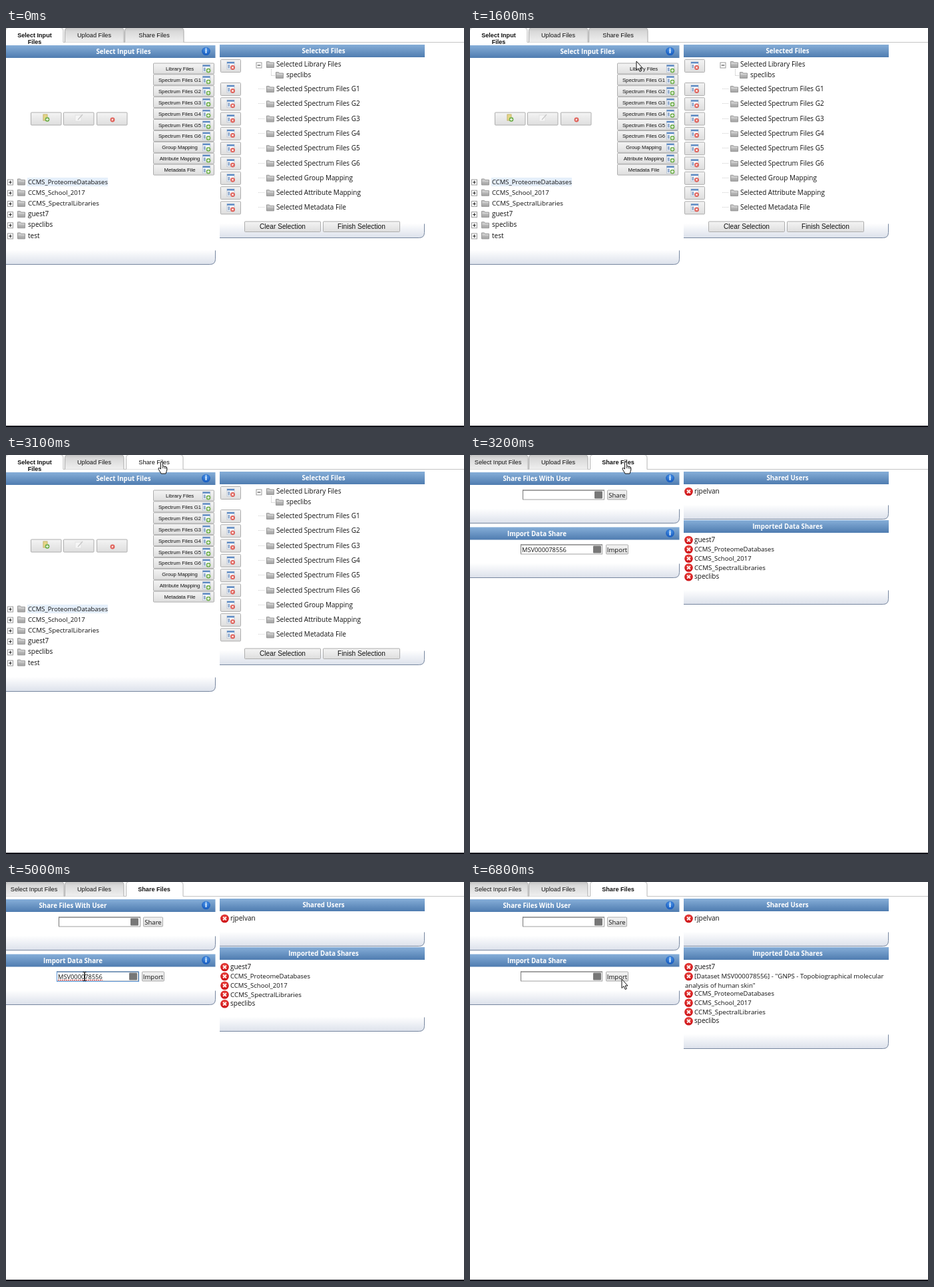
These frames come from a looping animation (688x600 px, 7100 ms). An HTML page:

```html
<!DOCTYPE html>
<html lang="en">
<head>
<meta charset="utf-8">
<title>File sharing</title>
<style>
html, body { margin: 0; width: 100%; height: 100%; overflow: hidden; background: #fff; }
svg { display: block; width: 688px; height: 600px; }
text { font-family: "Open Sans", "Noto Sans", sans-serif; font-size: 10px; fill: #111; }
.ui { font-family: "Liberation Sans", Arial, sans-serif; }
.head { font-size: 9.7px; font-weight: 700; fill: #fff; }
.mid { text-anchor: middle; }
</style>
</head>
<body>
<svg id="stage" viewBox="0 0 688 600">
  <defs>
    <linearGradient id="bar" x2="0" y2="1"><stop stop-color="#86aed8"/><stop offset="1" stop-color="#4f7cb0"/></linearGradient>
    <linearGradient id="foot" x2="0" y2="1"><stop stop-color="#fff"/><stop offset="1" stop-color="#dce1eb"/></linearGradient>
    <linearGradient id="tab" x2="0" y2="1"><stop stop-color="#c2c2c2"/><stop offset=".25" stop-color="#d8d8d8"/><stop offset="1" stop-color="#f0f0f0"/></linearGradient>
    <linearGradient id="btn" x2="0" y2="1"><stop stop-color="#f4f4f4"/><stop offset="1" stop-color="#dedede"/></linearGradient>
    <linearGradient id="fold" x2="0" y2="1"><stop stop-color="#cfcfcf"/><stop offset="1" stop-color="#a2a2a2"/></linearGradient>
    <radialGradient id="blue" cy=".35"><stop stop-color="#5aa2f0"/><stop offset="1" stop-color="#1d62c4"/></radialGradient>
    <radialGradient id="red" cy=".35"><stop stop-color="#f4584e"/><stop offset="1" stop-color="#d0181c"/></radialGradient>
  </defs>
</svg>
<script>
const LOOP = 7100, STEP = 100;
const ENTER = 300, SWITCH = 3200, FOCUS = 4600, DONE = 6200;

const rect = (x, y, w, h, fill, stroke = 'none', r = 0) =>
  `<rect x="${x}" y="${y}" width="${w}" height="${h}" rx="${r}" fill="${fill}" stroke="${stroke}"/>`;
const path = (d, stroke, fill = 'none', extra = '') =>
  `<path d="${d}" fill="${fill}" stroke="${stroke}" ${extra}/>`;
const circle = (x, y, r, fill) => `<circle cx="${x}" cy="${y}" r="${r}" fill="${fill}"/>`;
const text = (x, y, s, size = 10, cls = '', weight = 400) =>
  `<text x="${x}" y="${y}" class="${cls}" style="font-size:${size}px;font-weight:${weight}">${s}</text>`;
const group = (id, s) => `<g id="${id}">${s}</g>`;
const at = (x, y, s) => `<g transform="translate(${x} ${y})">${s}</g>`;

// Page furniture
const header = (x, y, w, cx, s) => rect(x, y, w, 19, 'url(#bar)') +
  `<text x="${cx}" y="${y + 13}" class="head mid">${s}</text>`;
const footer = (x, bottom, right) => {
  const edge = `V${bottom - 8}Q${right} ${bottom} ${right - 8} ${bottom}H${x}`;
  return path(`M${x} ${bottom - 22}H${right}${edge}Z`, 'none', 'url(#foot)') +
    path(`M${right} ${bottom - 21}${edge}`, '#76869f');
};
const info = y => circle(300.5, y, 6.3, 'url(#blue)') +
  `<text x="300.5" y="${y + 3.4}" class="head mid">i</text>`;
const button = (x, y, w, h) => rect(x + .5, y + .5, w - 1, h - 1, 'url(#btn)', '#adadad', 1);
const tab = (x, right, on) => path(
  `M${x + .5} 21.5V4.5Q${x + .5} -.5 ${x + 5} -.5H${right - 5}Q${right} -.5 ${right} 4.5V21.5`,
  on ? '#b4b4b4' : '#a8a8a8', on ? '#fff' : 'url(#tab)');
const tabText = (cx, y, s, bold) => text(cx, y, s, bold ? 9.1 : 9.2, 'ui mid', bold ? 700 : 400);
const baseLine = path('M0 21.5H688', '#c4c4c4');

// Icons
const folder = (x, y) => at(x, y, path('M.5 -4.5H4.5L5.5 -3H11.5V4.5H.5Z', '#999', 'url(#fold)') +
  path('M1.5 -1.5H11', '#e2e2e2', 'none', 'stroke-width=".8"'));
const toggle = (x, y, plus) => rect(x - 4, y - 4, 8, 8, '#fff', '#9a9a9a') +
  path(`M${x - 2.3} ${y}h4.6` + (plus ? `M${x} ${y - 2.3}v4.6` : ''), '#222');
const sheet = (x, y) => rect(x, y - 6, 11, 11, '#fbfcfe', '#c0c9d6') +
  rect(x, y - 6, 11, 2.4, '#5c8ac4') + rect(x + 1.3, y - 2, 3, 5.5, '#93abcd');
const badge = (x, y, fill, d) => circle(x, y, 3.4, fill) + at(x, y, path(d, '#fff', 'none', 'stroke-width="1.1"'));
const plusBadge = (x, y) => badge(x, y, '#74b152', 'M-2 0H2M0 -2V2');
const crossBadge = (x, y) => badge(x, y, '#de5a52', 'M-1.3 -1.3L1.3 1.3M1.3 -1.3L-1.3 1.3');
const remove = y => circle(328.5, y, 6.3, 'url(#red)') +
  at(328.5, y, path('M-2.4 -2.4L2.4 2.4M2.4 -2.4L-2.4 2.4', '#fff', 'none', 'stroke-width="1.8"'));

// Selection page
const slots = ['Library Files', ...[1, 2, 3, 4, 5, 6].map(n => 'Spectrum Files G' + n),
  'Group Mapping', 'Attribute Mapping', 'Metadata File'];
const shares = ['CCMS_ProteomeDatabases', 'CCMS_School_2017', 'CCMS_SpectralLibraries'];
const sizes = { CCMS_ProteomeDatabases: 9.5, CCMS_School_2017: 9.55, CCMS_SpectralLibraries: 9.8 };
const name = (x, y, s) => text(x, y, s, sizes[s] || 10);

const selectPage = () => {
  let s = baseLine + tab(88, 177, false) + group('shareOff', tab(178, 267, false)) +
    group('shareHover', tab(180, 266, true)) +
    tab(-1, 86, true) + rect(0, 21, 85.5, 1, '#fff') +
    tabText(43, 14, 'Select Input', true) + tabText(43, 24, 'Files', true) +
    tabText(132.5, 14, 'Upload Files') + tabText(222.5, 14, 'Share Files') +
    header(0, 26, 314.5, 176.5, 'Select Input Files') + info(35) +
    header(321, 25, 308, 477, 'Selected Files') + footer(0, 355.5, 314.5) + footer(321, 315.5, 628.5);

  slots.forEach((label, i) => {
    const y = 61 + i * 16.9, row = i ? 69.7 + i * 22.3 : 57;
    s += button(221, y - 8.5, 92, 17) + text(261, y + 3, label, 7.75, 'ui mid') +
      sheet(295.5, y + .5) + plusBadge(304, y + 3);
    s += button(322, row - 10, 31, 20) + sheet(332, row) + crossBadge(340.5, row + 2.5);
    const mid = i ? row - .5 : 54.5;
    s += folder(391, mid + .5) + text(406, mid + 3.5, 'Selected ' + label);
    if (i) s += path(`M379 ${Math.floor(mid) + .5}H388`, '#ccc', 'none', 'stroke-dasharray="1 1"');
  });
  s += toggle(380, 56, false) + folder(405, 71) + text(421, 74, 'speclibs') +
    path('M398.5 62V71.5H404', '#bbb', 'none', 'stroke-dasharray="1 1"');

  [37, 86, 136].forEach(x => s += button(x, 126.5, 46.5, 20));
  s += rect(56, 130, 6, 9, '#e6d688', '#c4b468') + plusBadge(62, 137.5) +
    rect(104, 131, 9, 9, '#f6f6f6', '#e2e2e2') + path('M108 138L115 130', '#c8c8c8', 'none', 'stroke-width="1.4"') +
    crossBadge(160, 138);

  s += rect(32, 225, 121, 13, '#e5effa');
  [...shares, 'guest7', 'speclibs', 'test'].forEach((label, i) => {
    const y = 231 + i * 16.2;
    s += toggle(6.5, y + 1, true) + folder(17, y + .5) + name(33, y + 3.6, label);
  });
  [[358, 115, 'Clear Selection'], [476, 116, 'Finish Selection']].forEach(([x, w, label]) =>
    s += button(x, 290.5, w, 16.5) + text(x + w / 2, 302.3, label, 10.2, 'ui mid'));
  return s;
};

// Sharing page
const field = (x, y) => rect(x + .5, y + .5, 122, 14, '#fff', '#a0a0a0') +
  path(`M${x} ${y + .5}h123M${x + .5} ${y}v14`, '#777');
const hint = (x, y) => rect(x, y, 12, 11, '#777', 'none', 1);

const importList = done => {
  const shift = done ? 26 : 0;
  let s = remove(128) + name(337, 131, 'guest7');
  if (done) s += remove(142) +
    text(337, 145, '[Dataset MSV000078556] - "GNPS - Topobiographical molecular', 9.7) +
    text(323, 159, 'analysis of human skin"', 9.6);
  [...shares, 'speclibs'].forEach((label, i) => {
    const y = 142 + shift + i * 13.75;
    s += remove(y) + name(337, y + 3.2, label);
  });
  return footer(321, 224.5 + shift, 628.5) + s;
};

const sharePage = () => baseLine + tab(-1, 87, false) + tab(88, 177, false) + tab(180, 266, true) +
  rect(181, 21, 84.5, 1, '#fff') +
  tabText(42, 14, 'Select Input Files') + tabText(132.5, 14, 'Upload Files') + tabText(222.5, 14, 'Share Files', true) +
  footer(0, 102.5, 314.5) + footer(0, 184.5, 314.5) + footer(321, 96.5, 628.5) +
  header(0, 26, 314.5, 100.5, 'Share Files With User') + info(35) +
  header(0, 108.5, 314.5, 100.5, 'Import Data Share') + info(117.5) +
  header(321, 25, 308, 477, 'Shared Users') + header(321, 98, 308, 477, 'Imported Data Shares') +
  remove(55) + text(337, 58, 'rjpelvan') +
  field(79, 52.5) + hint(187, 54.5) + button(206, 52.5, 30, 15) + text(221, 64, 'Share', 9.5, 'mid') +
  field(76, 134.5) + group('focusRing', rect(76.5, 135, 123, 14.5, 'none', '#5a94d6')) +
  hint(185, 136.5) + button(204, 134.5, 34, 15) + text(221, 146, 'Import', 9.5, 'mid') +
  group('dataset', text(78, 146, 'MSV000078556', 9.3)) +
  group('spelling', path('M78 147.5H145', '#e03030', 'none', 'stroke-dasharray="2 1"')) +
  group('caret', path('M118.5 136.5V147.5', '#111')) +
  group('listBefore', importList(false)) + group('listAfter', importList(true));

const pointer = group('arrow', path('M0 0V13.5L3 10.7L5.2 15.5L7.3 14.5L5.1 10H9Z', '#111', '#fff')) +
  group('hand', path('M-1.5 1Q0 -1 1.5 1V6.5L7 8Q8.5 9 7.7 13L6 18H-1L-4.8 11.5Q-5.5 9 -3.5 9.5L-1.5 11Z', '#111', '#fff') +
    path('M1.5 7V10M4 8V10.5M6.2 8.5V11', '#111', 'none', 'stroke-width=".8"')) +
  group('beam', path('M-2.5 -6.5H-.7L0 -6L.7 -6.5H2.5M0 -6V6M-2.5 6.5H-.7L0 6L.7 6.5H2.5', '#111'));

const stage = document.getElementById('stage');
stage.innerHTML += group('select', selectPage()) + group('share', sharePage()) +
  group('cursor', pointer) + rect(0, 598, 688, 2, '#16161c');

// time, x, y of the pointer's hot spot
const route = [[ENTER, 675, 588], [700, 547.5, 556.5], [800, 525, 517], [1200, 380, 240], [1600, 250, 50],
  [1900, 230, 18], [2300, 228, 13], [2900, 234, 10], [3400, 234, 10], [4100, 113.5, 133.5],
  [4400, 118, 142], [5000, 118, 142], [5700, 228, 146], [LOOP, 228, 146]];

const place = t => {
  const i = Math.max(1, route.findIndex(k => k[0] > t));
  const [t0, x0, y0] = route[i - 1], [t1, x1, y1] = route[i];
  const p = Math.max(0, (t - t0) / (t1 - t0));
  return [x0 + (x1 - x0) * p, y0 + (y1 - y0) * p];
};
const show = (id, on) => document.getElementById(id).style.display = on ? '' : 'none';

function draw(now) {
  const t = Math.floor(now % LOOP / STEP) * STEP;
  const [x, y] = place(t);
  const shared = t >= SWITCH, done = t >= DONE, focused = t >= FOCUS && !done;
  const hand = y < 22 && x > 180 && x < 266;
  const beam = shared && y > 135 && x < 199;
  show('select', !shared);
  show('share', shared);
  show('shareHover', hand);
  show('shareOff', !hand);
  show('focusRing', focused);
  show('spelling', focused);
  show('caret', focused && Math.floor((t - FOCUS) / 530) % 2 === 0);
  show('dataset', !done);
  show('listBefore', !done);
  show('listAfter', done);
  show('cursor', t >= ENTER);
  show('hand', hand);
  show('beam', beam);
  show('arrow', !hand && !beam);
  document.getElementById('cursor').setAttribute('transform', `translate(${x} ${y})`);
}

const start = performance.now();
const tick = () => {
  draw(performance.now() - start);
  requestAnimationFrame(tick);
};
tick();
</script>
</body>
</html>
```
